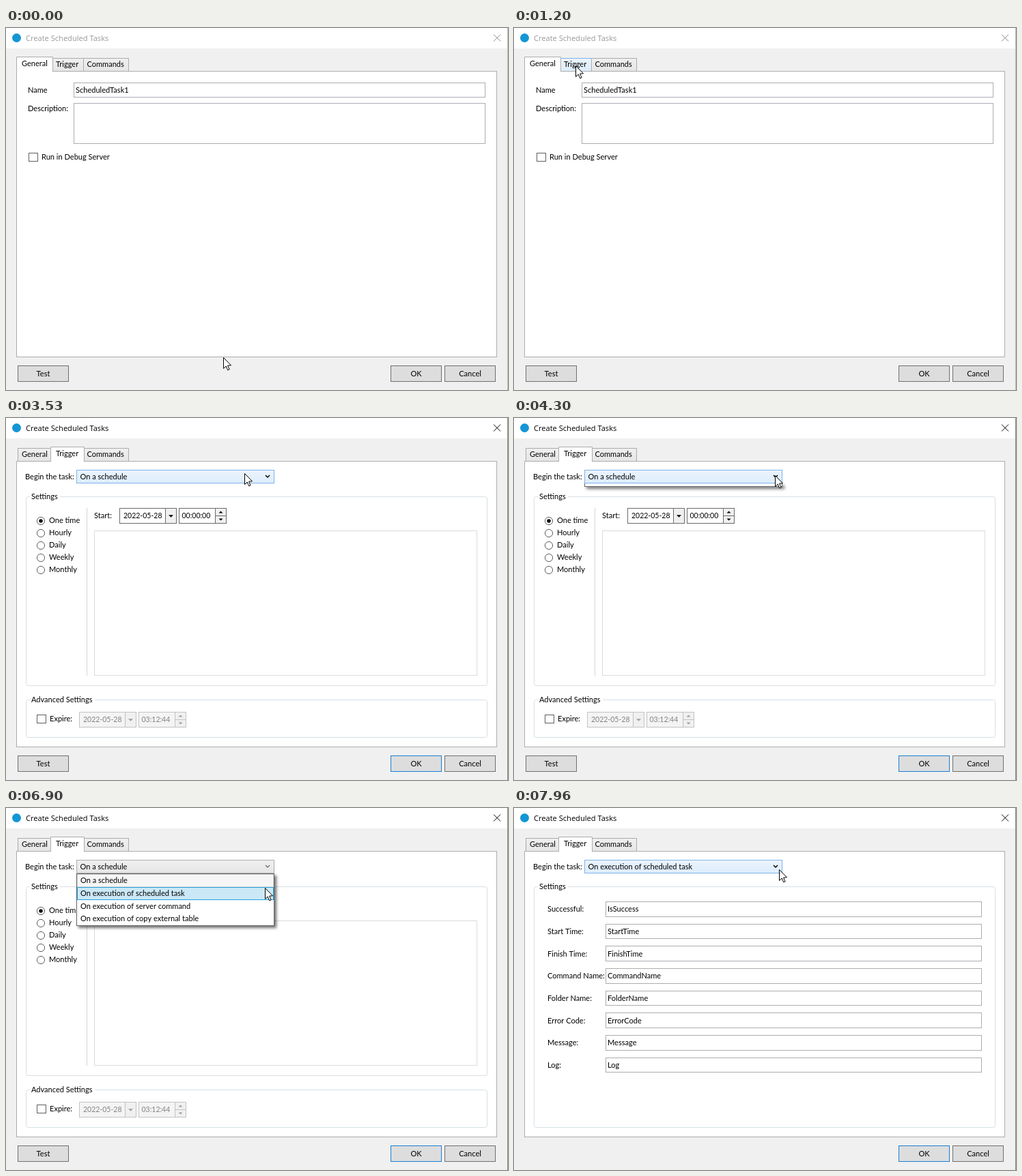
These frames come from a looping animation (735 px wide and 531 px high, 8000 ms). An HTML page with a canvas:

```html
<!DOCTYPE html>
<html lang="en">
<head>
<meta charset="utf-8">
<title>Create Scheduled Tasks</title>
<style>
  html, body { margin: 0; width: 100%; height: 100%; overflow: hidden; background: #f0f0f0; }
  canvas { display: block; width: 735px; height: 531px; }
</style>
</head>
<body>
<canvas id="stage" width="735" height="531"></canvas>
<script>
const ctx = document.getElementById('stage').getContext('2d');
const LOOP = 8000;
const BODY = '11.05px Lato, sans-serif';
const DIGITS = '10.5px Lato, sans-serif';
const TITLE = '11.1px "Open Sans", sans-serif';
const BLUE = '#7eb4ea', GREY = '#acacac', FIELD = '#abadb3', GROUP = '#d5dfe5';

// Pointer stops: time, x, y
const stops = [
  [0, 318, 483], [830, 93, 68], [960, 91, 57], [1160, 91, 57], [1200, 90, 55],
  [2965, 90, 55], [3000, 107, 55], [3660, 376, 84], [3800, 376, 84], [4030, 382, 84],
  [5830, 382, 84], [5860, 383, 84], [6660, 380, 113], [6700, 380, 114], [6870, 380, 114],
  [6930, 379, 120], [7500, 379, 120], [7960, 388, 90], [8000, 388, 90]
];
const clamp = v => Math.max(0, Math.min(1, v));
const ease = p => p * p * (3 - 2 * p);

function pointerAt(t) {
  const i = Math.max(1, stops.findIndex(s => s[0] >= t));
  const [t0, x0, y0] = stops[i - 1], [t1, x1, y1] = stops[i];
  const p = ease(clamp((t - t0) / (t1 - t0)));
  return { x: Math.round(x0 + (x1 - x0) * p), y: Math.round(y0 + (y1 - y0) * p) };
}

const inside = (m, x, y, r, b) => m.x >= x && m.x < r && m.y >= y && m.y < b;

// Edges are pixel bounds; the 1px border lies just inside
function box(x, y, r, b, fill, line) {
  if (fill) { ctx.fillStyle = fill; ctx.fillRect(x, y, r - x, b - y); }
  if (line) {
    ctx.strokeStyle = line;
    ctx.lineWidth = 1;
    ctx.strokeRect(x + .5, y + .5, r - x - 1, b - y - 1);
  }
}

function shade(y, b, top, bottom) {
  const g = ctx.createLinearGradient(0, y, 0, b);
  g.addColorStop(0, top);
  g.addColorStop(1, bottom);
  return g;
}
const plainShade = (y, b) => shade(y, b, '#f0f0f0', '#e5e5e5');
const hotShade = (y, b) => shade(y, b, '#ecf4fc', '#dcecfc');

function text(s, x, mid, color = '#000', font = BODY, align = 'left') {
  ctx.font = font;
  ctx.fillStyle = color;
  ctx.textAlign = align;
  ctx.fillText(s, x, Math.floor(mid) + 4);
}

function path(points, fill, line, width = 1) {
  ctx.beginPath();
  points.forEach(([x, y]) => ctx.lineTo(x, y));
  if (fill) { ctx.closePath(); ctx.fillStyle = fill; ctx.fill(); }
  if (line) { ctx.strokeStyle = line; ctx.lineWidth = width; ctx.stroke(); }
}

function arrow(x, y, dir, color, size = 3) {
  path([[x - size, y - dir * size / 2], [x + size, y - dir * size / 2], [x, y + dir * size / 2]], color);
}

function titleBar(active) {
  box(0, 0, 735, 30, '#fff');
  ctx.fillStyle = '#1496d4';
  ctx.beginPath();
  ctx.arc(15.5, 14.5, 6.5, 0, 7);
  ctx.fill();
  text('Create Scheduled Tasks', 29, 15, active ? '#000' : '#999', TITLE);
  const c = active ? '#000' : '#888';
  path([[714, 9.5], [724, 19.5]], null, c);
  path([[724, 9.5], [714, 19.5]], null, c);
}

function button(label, x, isDefault) {
  box(x, 495, x + 75, 519, '#ddd', isDefault ? '#1a7fd4' : '#707070');
  text(label, x + 37.5, 507, '#000', BODY, 'center');
}

function tabs(selected, m) {
  const list = [['General', 17, 69, 23], ['Trigger', 68, 114, 73], ['Commands', 113, 180, 118.5]];
  list.forEach(([label, x, r, tx], i) => {
    if (i === selected) return;
    const hot = inside(m, x + 1, 44, r, 63);
    box(x, 44, r, 64, hot ? hotShade(44, 64) : plainShade(44, 64), hot ? BLUE : GREY);
    text(label, tx, 53);
  });
  box(15, 63, 719, 483, '#fff', GREY);
  const [label, , , tx] = list[selected];
  const x = selected ? 65 : 15, r = selected ? 115 : 69;
  box(x, 42, r, 65, '#fff');
  path([[x + .5, 64], [x + .5, 42.5], [r - .5, 42.5], [r - .5, 64]], null, GREY);
  if (!selected) path([[15.5, 60], [15.5, 70]], null, GREY);
  text(label, tx, 52);
}

function field(x, y, r, b, m, value) {
  box(x, y, r, b, '#fff', inside(m, x, y, r, b) ? BLUE : FIELD);
  if (value) text(value, x + 3, (y + b) / 2);
}

function checkBox(x, y) { box(x, y, x + 14, y + 13, '#fff', '#606060'); }

function generalPage(m) {
  text('Name', 32, 91);
  field(99, 80, 702, 102, m, 'ScheduledTask1');
  text('Description:', 32, 118);
  field(99, 110, 702, 170, m);
  checkBox(33, 183);
  text('Run in Debug Server', 52, 189);
}

function groupBox(label, y, b, gapEnd, border = true) {
  if (border) {
    ctx.strokeStyle = GROUP;
    ctx.lineWidth = 1;
    ctx.beginPath();
    ctx.roundRect(29.5, y + .5, 675, b - y - 1, 3);
    ctx.stroke();
    box(35, y - 1, gapEnd, y + 2, '#fff');
  }
  text(label, 37, y);
}

function combo(value, m) {
  const hot = inside(m, 103, 76, 393, 96);
  box(103, 76, 393, 96, hot ? hotShade(76, 96) : plainShade(76, 96), hot ? BLUE : GREY);
  text(value, 108.5, 86);
  path([[380, 84], [383, 87], [386, 84]], null, hot ? '#000' : '#606060', hot ? 1.5 : 1.1);
}

function dateTime(x, y, time, enabled) {
  const line = enabled ? '#6a6a6a' : '#c3c3c3', ink = enabled ? '#000' : '#838383';
  const back = enabled ? '#fff' : '#f4f4f4', mark = enabled ? '#000' : '#a0a0a0';
  const b = y + 23, mid = y + 11.5;
  box(x, y, x + 84, b, back, line);
  box(x + 67, y, x + 84, b, '#f0f0f0', line);
  text('2022-05-28', x + 6, mid, ink, DIGITS);
  arrow(x + 75.5, mid + .5, 1, mark, 3.5);
  box(x + 87, y, x + 157, b, back, line);
  box(x + 140, y, x + 157, b, '#f0f0f0', line);
  path([[x + 140, mid], [x + 157, mid]], null, line);
  text(time, x + 91.5, mid, ink, DIGITS);
  arrow(x + 148.5, y + 6, -1, mark);
  arrow(x + 148.5, y + 17, 1, mark);
}

function schedulePage() {
  groupBox('Settings', 115, 393, 79);
  ['One time', 'Hourly', 'Daily', 'Weekly', 'Monthly'].forEach((label, i) => {
    const y = 151 + 18 * i;
    ctx.strokeStyle = '#606060';
    ctx.lineWidth = 1;
    ctx.beginPath();
    ctx.arc(51, y, 5.6, 0, 7);
    ctx.stroke();
    if (!i) {
      ctx.fillStyle = '#111';
      ctx.beginPath();
      ctx.arc(51, y, 2.8, 0, 7);
      ctx.fill();
    }
    text(label, 63, y - 1);
  });
  path([[118.5, 132], [118.5, 378]], null, '#d5d5d5');
  text('Start:', 129, 143);
  dateTime(166, 132, '00:00:00', true);
  box(129, 165, 690, 378, null, '#dcdcdc');
  groupBox('Advanced Settings', 413, 469, 130);
  checkBox(45, 435);
  text('Expire:', 64, 441);
  dateTime(107, 431, '03:12:44', false);
}

function taskPage(border, m) {
  groupBox('Settings', 115, 469, 79, border);
  const rows = [
    ['Successful', 'IsSuccess'], ['Start Time', 'StartTime'], ['Finish Time', 'FinishTime'],
    ['Command Name', 'CommandName'], ['Folder Name', 'FolderName'], ['Error Code', 'ErrorCode'],
    ['Message', 'Message'], ['Log', 'Log']
  ];
  rows.forEach(([label, value], i) => {
    const y = 137 + 32.65 * i, mid = Math.round(y + 11.4);
    field(134, Math.round(y), 685, Math.round(y + 22.6), m);
    text(label + ':', 49, mid);
    text(value, 137, mid);
  });
}

function popup(t, m) {
  const full = 77, h = Math.round(4 + 73 * clamp((t - 4300) / 130));
  ctx.save();
  ctx.shadowColor = 'rgba(0,0,0,.55)';
  ctx.shadowBlur = 4;
  ctx.shadowOffsetX = ctx.shadowOffsetY = 3;
  ctx.beginPath();
  ctx.rect(100, 96, 300, 90);
  ctx.clip();
  box(103, 96, 393, 96 + h, '#fff');
  ctx.restore();

  ctx.save();
  ctx.beginPath();
  ctx.rect(103, 96, 290, h);
  ctx.clip();
  ctx.translate(0, h - full);
  box(103, 96, 393, 173, '#fff', '#646464');
  const hot = m.y >= 116 ? 1 : 0;
  if (hot) box(104, 97, 392, 116, '#f6f6f6', '#dadada');
  box(104, 97 + 19 * hot, 392, 116 + 19 * hot, '#cbe8f6', '#26a0da');
  ['On a schedule', 'On execution of scheduled task', 'On execution of server command',
    'On execution of copy external table'].forEach((s, i) => text(s, 109, Math.round(106 + 18.8 * i)));
  ctx.restore();
}

function pointer({ x, y }) {
  const shape = [[0, 0], [0, 16], [3.7, 12.5], [6.2, 18.3], [8.6, 17.3], [6.1, 11.6], [11, 11.3]];
  const pts = shape.map(([dx, dy]) => [x + dx + .5, y + dy + .5]);
  path([...pts, pts[0]], '#fff', '#000');
}

function draw(t) {
  const m = pointerAt(t);
  const active = t >= 1630, trigger = t >= 1730, chosen = t >= 7200, taskForm = t >= 7260;
  box(0, 0, 735, 531, '#f0f0f0');
  titleBar(active);
  tabs(trigger ? 1 : 0, m);
  if (!trigger) {
    generalPage(m);
  } else {
    text('Begin the task:', 28, 86);
    combo(chosen ? 'On execution of scheduled task' : 'On a schedule', m);
    if (taskForm) taskPage(t >= 7300, m);
    else schedulePage();
  }
  if (!taskForm) button('Test', 17);
  button('OK', 563, active);
  button('Cancel', 642);
  box(734, 0, 735, 531, active ? '#808080' : '#b4b4b4');
  if (t >= 4300 && !chosen) popup(t, m);
  pointer(m);
}

const start = performance.now();
function tick() {
  draw((performance.now() - start) % LOOP);
  requestAnimationFrame(tick);
}
tick();
</script>
</body>
</html>
```
